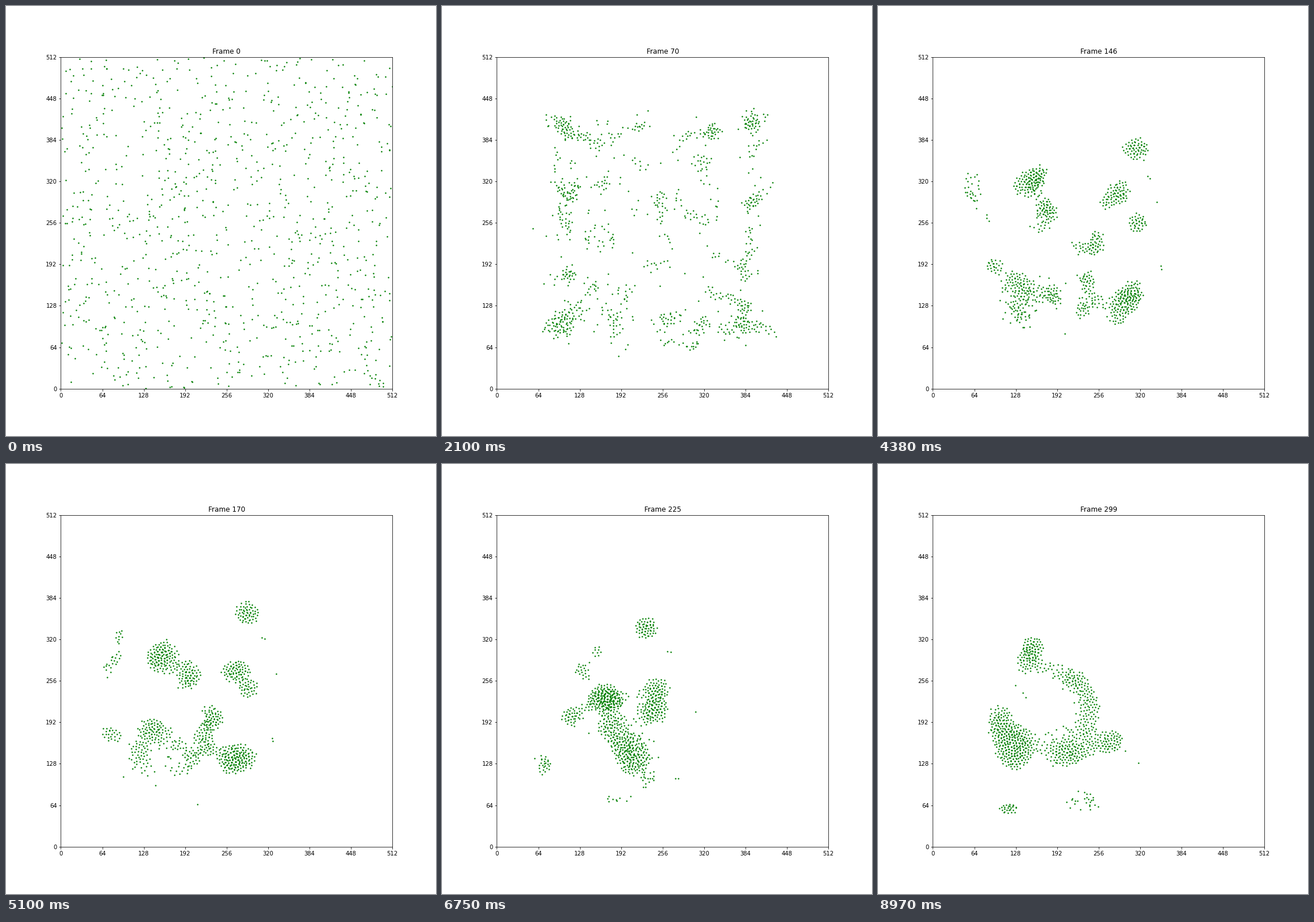
A matplotlib script that plays this animation: 748x748 px, repeating every 9000 ms.

```python
import numpy as np
import matplotlib.pyplot as plt
from matplotlib.animation import FuncAnimation

SIZE, MARGIN = 512, 64
COUNT, FRAMES = 1000, 300
SIGHT, PERSONAL = 24, 4.5
COHESION, ALIGNMENT, AVOIDANCE = 0.004, 0.05, 0.025
TURN, JITTER = 0.1, 0.04
SLOWEST, FASTEST = 0.8, 1.8
DRIFT = (-0.32, -0.2)

rng = np.random.default_rng(7)


def within(d2, radius):
    """Neighbour matrix and the number of neighbours of each dot."""
    near = (d2 < radius ** 2).astype(np.float32)
    return near, near.sum(1, keepdims=True)


def step(p, v):
    """One move of the flock: gather, align, keep apart, turn at the margin."""
    sq = (p * p).sum(1)
    d2 = sq[:, None] + sq - 2 * p @ p.T
    near, n = within(d2, SIGHT)
    close, crowd = within(d2, PERSONAL)

    v = (v + COHESION * (near @ p / n - p)
         + ALIGNMENT * (near @ v / n - v)
         + AVOIDANCE * (crowd * p - close @ p)
         + JITTER * rng.standard_normal(v.shape))
    edge = SIZE / 2 - MARGIN
    v += TURN * ((p < -edge).astype(float) - (p > edge))

    speed = np.hypot(v[:, 0], v[:, 1])[:, None]
    v *= np.clip(speed, SLOWEST, FASTEST) / speed
    return (p + v).astype(np.float32), v.astype(np.float32)


def simulate():
    """Positions in every frame, from a uniform scatter."""
    p = rng.uniform(-SIZE / 2, SIZE / 2, (COUNT, 2)).astype(np.float32)
    v = rng.normal(DRIFT, 0.9, (COUNT, 2)).astype(np.float32)
    track = []
    for _ in range(FRAMES):
        track.append(p + SIZE / 2)
        p, v = step(p, v)
    return track


track = simulate()

fig = plt.figure(figsize=(10.389, 10.389), dpi=72)
side = 576.576 / 748
ax = fig.add_axes((95.472 / 748, 82.368 / 748, side, side))
ticks = range(0, SIZE + 1, MARGIN)
ax.set(xlim=(0, SIZE), ylim=(0, SIZE), xticks=ticks, yticks=ticks)
dots, = ax.plot([], [], "g.", markersize=3)
title = ax.set_title("Frame 0")


def update(n):
    dots.set_data(*track[n].T)
    title.set_text(f"Frame {n}")
    return dots, title


anim = FuncAnimation(fig, update, frames=FRAMES, interval=30, repeat=True,
                     repeat_delay=0, blit=False)
plt.show()
```
